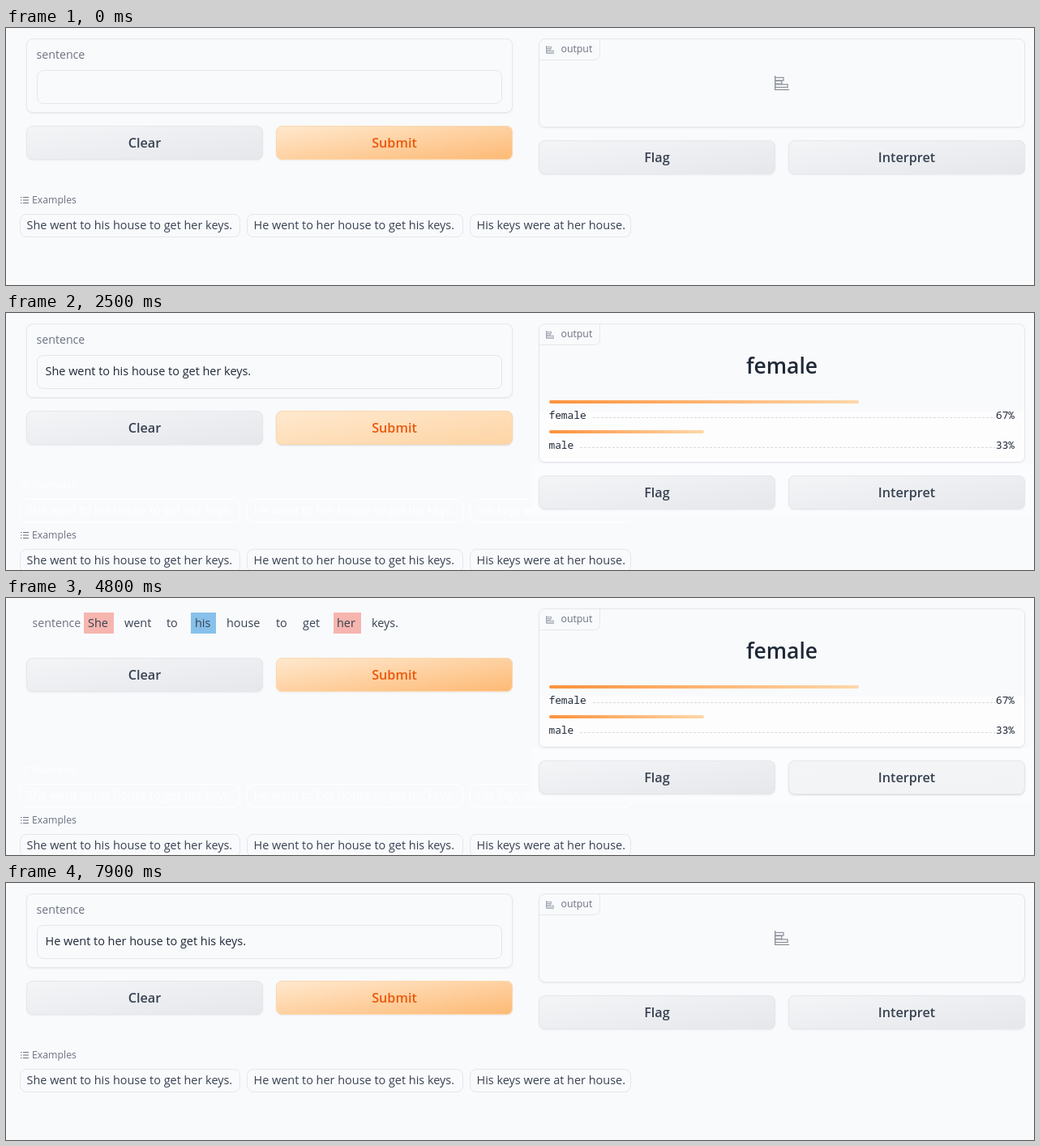
Recreate the animation shown at these times as an HTML page with a canvas. Size 1268 px wide and 318 px high, loop 8000 ms.

```html
<!DOCTYPE html>
<html lang="en">
<head>
<meta charset="utf-8">
<title>Sentence demo</title>
<style>
  html, body { margin: 0; width: 100%; height: 100%; overflow: hidden; background: #f9fafc; }
  canvas { display: block; }
</style>
</head>
<body>
<canvas id="stage" width="1268" height="318"></canvas>
<script>
const ctx = document.getElementById('stage').getContext('2d');
const LOOP = 8000;
const BG = '#f9fafc', LINE = '#e5e7eb', GRAY = '#6b7280', INK = '#374151', DARK = '#1f2937';
const SANS = '"Open Sans", "Noto Sans", sans-serif';
const MONO = '"Noto Sans Mono", "DejaVu Sans Mono", monospace';
const BODY = `14.45px ${SANS}`;
const SMALL = `12.3px ${SANS}`;
const BUTTON = `600 16.2px ${SANS}`;
const EXAMPLES = [
  { text: 'She went to his house to get her keys.', x: 17, w: 272 },
  { text: 'He went to her house to get his keys.', x: 297, w: 267 },
  { text: 'His keys were at her house.', x: 572, w: 199 }
];
const PINK = '#f6b5af', BLUE = '#87c0ea';
const WORDS = [
  ['She', 101, PINK, 96, 37], ['went', 146], ['to', 198], ['his', 233, BLUE, 228, 31],
  ['house', 272], ['to', 333], ['get', 366], ['her', 408, PINK, 404, 34], ['keys.', 451]
];

function text(str, x, y, font, color, align = 'left') {
  ctx.font = font;
  ctx.fillStyle = color;
  ctx.textAlign = align;
  ctx.fillText(str, x, y);
}

function rect(x, y, w, h, fill, radius = 0) {
  ctx.beginPath();
  ctx.roundRect(x, y, w, h, radius);
  ctx.fillStyle = fill;
  ctx.fill();
}

// Rounded box with a one pixel border inside its bounds
function box(x, y, w, h, fill, border = LINE, shadow = 0) {
  ctx.save();
  if (shadow) {
    ctx.shadowColor = `rgba(0,0,0,${shadow})`;
    ctx.shadowBlur = 2;
    ctx.shadowOffsetY = 1;
  }
  rect(x, y, w, h, fill, 8);
  ctx.restore();
  ctx.beginPath();
  ctx.roundRect(x + .5, y + .5, w - 1, h - 1, 7.5);
  ctx.strokeStyle = border;
  ctx.lineWidth = 1;
  ctx.stroke();
}

function line(x1, y1, x2, y2) {
  ctx.beginPath();
  ctx.moveTo(x1, y1);
  ctx.lineTo(x2, y2);
  ctx.stroke();
}

// Corner-to-corner gradient whose midline joins the other two corners
function diagonal(x, y, w, h, from, to) {
  const k = 2 * w * h / (w * w + h * h);
  const g = ctx.createLinearGradient(x, y, x + h * k, y + w * k);
  g.addColorStop(0, from);
  g.addColorStop(1, to);
  return g;
}

function button(label, x, y, state = '', primary = false) {
  const w = 292, h = 42;
  const from = primary ? '#ffe9cf' : '#f4f5f7';
  const to = primary ? (state ? '#fed4a4' : '#fdb974') : (state ? '#f2f3f5' : '#e5e7eb');
  box(x, y, w, h, diagonal(x, y, w, h, from, to), primary ? '#fed7aa' : LINE,
      state === 'hover' ? .14 : .06);
  if (state === 'press') {
    ctx.save();
    ctx.beginPath();
    ctx.roundRect(x, y, w, h, 8);
    ctx.clip();
    ctx.shadowColor = 'rgba(0,0,0,.12)';
    ctx.shadowBlur = 4;
    ctx.shadowOffsetY = 2;
    ctx.strokeStyle = '#e0e2e6';
    ctx.stroke();
    ctx.restore();
  }
  text(label, x + w / 2, y + 27, BUTTON, primary ? '#ea580c' : INK, 'center');
}

function chartIcon(x, y, s, color) {
  ctx.save();
  ctx.translate(x, y);
  ctx.strokeStyle = color;
  ctx.lineWidth = s > 12 ? 1.2 : .9;
  ctx.beginPath();
  ctx.moveTo(.6, 0);
  ctx.lineTo(.6, s - .6);
  ctx.lineTo(s, s - .6);
  ctx.stroke();
  [[.13, .58], [.36, .46], [.6, .86]].forEach(([top, len]) =>
    ctx.strokeRect(.6, top * s, len * s, .2 * s));
  ctx.restore();
}

function listIcon(x, y, color) {
  ctx.strokeStyle = color;
  ctx.lineWidth = 1;
  for (let i = 0; i < 3; i++) {
    const ly = y + .5 + i * 3.5;
    line(x, ly, x + 1.5, ly);
    line(x + 3, ly, x + 10, ly);
  }
}

function examples(top, active = -1, ghost = false) {
  const tint = ghost ? '#ffffff' : GRAY;
  listIcon(18, top - 21, tint);
  text('Examples', 32, top - 13, SMALL, tint);
  EXAMPLES.forEach((e, i) => {
    const on = i === active;
    box(e.x, top, e.w, 29, on ? '#fff7ed' : BG, ghost ? '#ffffff' : on ? '#fdba74' : LINE);
    text(e.text, e.x + 8.5, top + 19, BODY, ghost ? '#ffffff' : INK);
  });
}

function ghostExamples() {
  ctx.save();
  ctx.beginPath();
  ctx.rect(0, 200, 650, 70);
  ctx.rect(650, 252, 150, 10);
  ctx.clip();
  examples(230, -1, true);
  ctx.restore();
}

function inputCard(value) {
  box(25, 13, 600, 92, BG, LINE, .06);
  text('sentence', 37.5, 38, `14.2px ${SANS}`, GRAY);
  box(38, 52, 574, 42, BG);
  text(value, 48.5, 77, BODY, DARK);
}

function tokens() {
  text('sentence', 32.5, 36, `14.2px ${SANS}`, GRAY);
  for (const [word, x, fill, left, w] of WORDS) {
    if (fill) rect(left, 18, w, 26, fill);
    text(word, x, 36, BODY, INK);
  }
}

function resultRow(label, percent, y, barW, dashX) {
  const g = ctx.createLinearGradient(670, 0, 670 + barW, 0);
  g.addColorStop(0, '#fb923c');
  g.addColorStop(1, '#fed7aa');
  rect(670, y, barW, 4, g, 2);
  text(label, 669.5, y + 23, `12.8px ${MONO}`, DARK);
  text(percent, 1244, y + 23, `12.8px ${MONO}`, DARK, 'right');
  ctx.save();
  ctx.strokeStyle = '#d5d8dd';
  ctx.lineWidth = 1;
  ctx.setLineDash([3, 2]);
  line(dashX, y + 21.5, 1220, y + 21.5);
  ctx.restore();
}

function outputCard(filled) {
  if (filled) rect(648, 186, 620, 66, '#fbfcfe');
  box(657, 13, 600, filled ? 172 : 110, BG, LINE, .06);
  if (filled) rect(658, 122, 598, 62, '#fdfdfe', [0, 0, 7, 7]);
  ctx.strokeStyle = LINE;
  ctx.lineWidth = 1;
  ctx.beginPath();
  ctx.moveTo(732.5, 13);
  ctx.arcTo(732.5, 39.5, 658, 39.5, 7);
  ctx.lineTo(657, 39.5);
  ctx.stroke();
  chartIcon(666, 22, 10, '#9ca3af');
  text('output', 684.5, 30, SMALL, GRAY);
  if (filled) {
    text('female', 957, 75, `600 26.5px ${SANS}`, DARK, 'center');
    resultRow('female', '67%', 108, 382, 724);
    resultRow('male', '33%', 145, 191, 708);
  } else {
    chartIcon(948, 59, 18, '#8b9099');
  }
}

function draw(t) {
  const within = (a, b) => t >= a && t < b;
  const filled = within(2500, 6700);
  const explained = within(4800, 6700);
  const value = within(1600, 4800) ? EXAMPLES[0].text : t >= 7700 ? EXAMPLES[1].text : '';
  const active = within(900, 2000) ? 0 : within(7200, 7900) ? 1 : -1;
  const clear = within(6600, 6700) ? 'press'
    : within(6300, 6600) || within(7000, 7100) ? 'hover' : '';
  const leftY = explained ? 74 : 121;
  const rightY = filled ? 201 : 139;

  rect(0, 0, 1268, 318, BG);
  if (filled) ghostExamples();
  if (explained) tokens(); else inputCard(value);
  outputCard(filled);
  button('Clear', 25, leftY, clear);
  button('Submit', 333, leftY, within(2100, 3500) ? 'hover' : '', true);
  button('Flag', 657, rightY);
  button('Interpret', 965, rightY, within(4100, 5900) ? 'hover' : '');
  examples(filled ? 292 : 230, active);
}

const start = performance.now();
function frame() {
  draw((performance.now() - start) % LOOP);
  requestAnimationFrame(frame);
}
frame();
</script>
</body>
</html>
```
